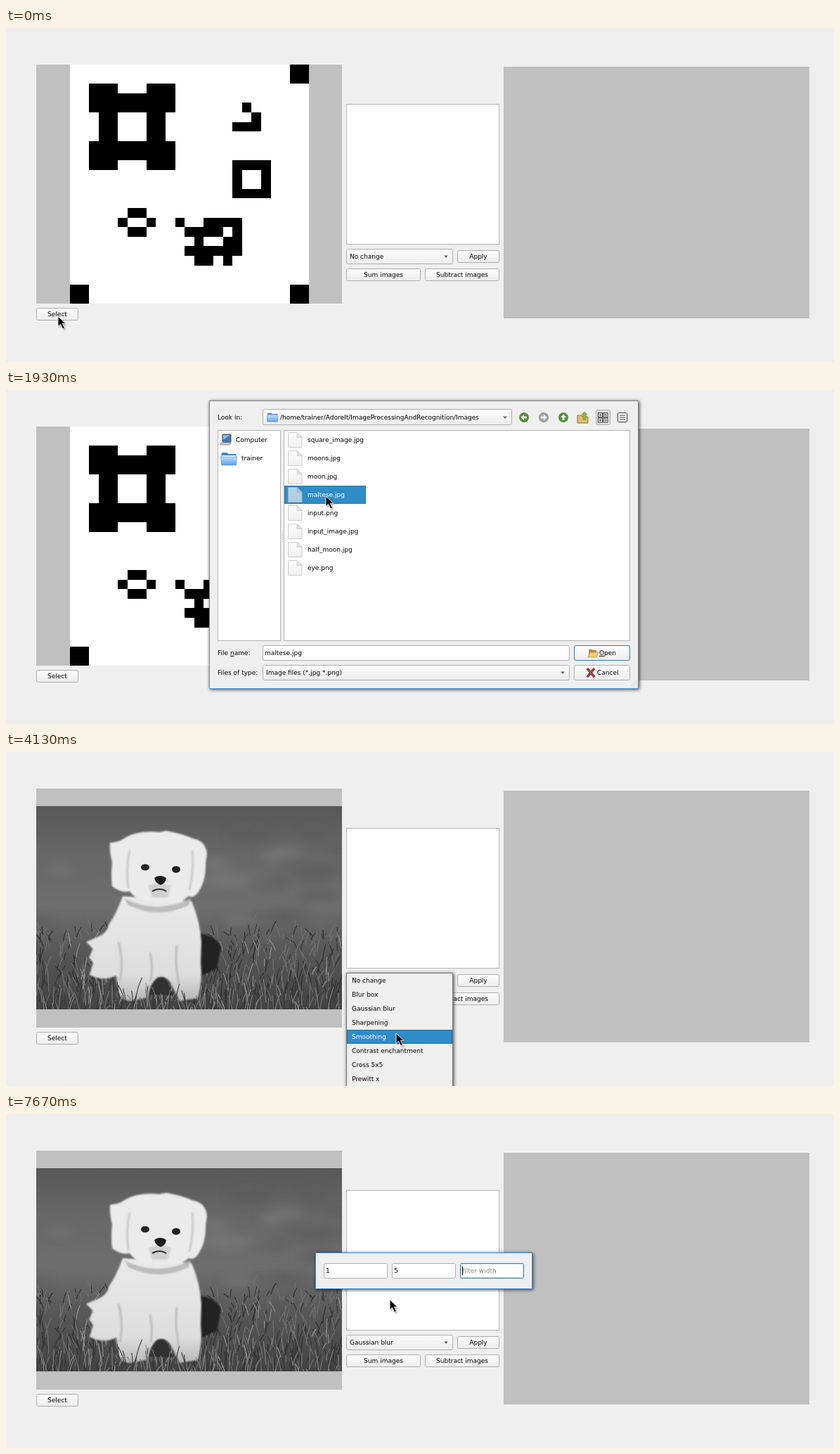
Write an HTML page that moves like this. It is 1178 px wide and 475 px high and loops after 8000 ms.

```html
<!DOCTYPE html>
<html lang="en">
<head>
<meta charset="utf-8">
<title>Image filter demo</title>
<style>
html, body { margin: 0; width: 100%; height: 100%; overflow: hidden; background: #efefef; }
svg { display: block; width: 1178px; height: 475px; }
text { font: 9px "DejaVu Sans", sans-serif; fill: #000; white-space: pre; }
.mid { text-anchor: middle; }
.hint { fill: #8c8c8c; }
.light { fill: #fff; }
.off { fill: #b4b4b4; }
</style>
</head>
<body>
<svg id="stage" viewBox="0 0 1178 475">
  <defs>
    <linearGradient id="face" x2="0" y2="1"><stop stop-color="#fdfdfd"/><stop offset="1" stop-color="#ececec"/></linearGradient>
    <linearGradient id="blue" x2="0" y2="1"><stop stop-color="#bfdcfa"/><stop offset="1" stop-color="#5d9fe6"/></linearGradient>
    <linearGradient id="paper" x2="0" y2="1"><stop stop-color="#fdfdfd"/><stop offset="1" stop-color="#efefef"/></linearGradient>
    <linearGradient id="lawn" x2="0" y2="1">
      <stop stop-color="#585858"/><stop offset=".25" stop-color="#686868"/><stop offset=".5" stop-color="#6e6e6e"/>
      <stop offset=".68" stop-color="#5a5a5a"/><stop offset="1" stop-color="#434343"/>
    </linearGradient>
    <linearGradient id="coat" x2="0" y2="1"><stop stop-color="#e9e9e9"/><stop offset=".75" stop-color="#dedede"/><stop offset="1" stop-color="#b8b8b8"/></linearGradient>
    <filter id="shade" x="-10%" y="-20%" width="120%" height="140%"><feDropShadow dx="1" dy="1" stdDeviation="2.5" flood-opacity=".75"/></filter>
    <filter id="soft" x="-50%" y="-50%" width="200%" height="200%"><feGaussianBlur stdDeviation="7"/></filter>
    <filter id="fuzz"><feGaussianBlur stdDeviation="1"/></filter>
    <clipPath id="photo"><path d="M43 77h435v289H43z"/></clipPath>
  </defs>
</svg>
<script>
const LOOP = 8000;
const stage = document.getElementById('stage');

// Seeded random numbers for the lawn
let seed = 7;
const rnd = (lo, hi) => {
  seed = (seed * 16807) % 2147483647;
  return lo + (hi - lo) * seed / 2147483647;
};

// Markup helpers; `during` shows its content between two times
const during = (from, to, body) => `<g data-from="${from}" data-to="${to}">${body}</g>`;
const text = (x, y, s, cls = '') => `<text x="${x}" y="${y}" class="${cls}">${s}</text>`;
const rect = (x, y, w, h, fill, extra = '') =>
  `<rect x="${x}" y="${y}" width="${w}" height="${h}" fill="${fill}" ${extra}/>`;
const path = (d, fill, extra = '') => `<path d="${d}" fill="${fill}" ${extra}/>`;
const frame = (x, y, w, h, fill, line, r = 2) =>
  rect(x + .5, y + .5, w - 1, h - 1, fill, `stroke="${line}" rx="${r}"`);
const box = (x, y, w, h, fill = 'url(#face)') => frame(x, y, w, h, fill, '#aeaeae');
const button = (x, y, w, label) => box(x, y, w, 18) + text(x + w / 2, y + 12, label, 'mid');
const arrow = (x, y) => path(`M${x - 3} ${y - 1.5}h6l-3 3.5z`, '#666');
const at = (x, y, body) => `<g transform="translate(${x} ${y})">${body}</g>`;
const caret = (x, y) => rect(x, y, 1, 12, '#000');
const focusRing = (x, y, w, h) => frame(x, y, w, h, '#fff', '#3584b5') +
  frame(x + 1, y + 1, w - 2, h - 2, 'none', '#c6dfee', 1);

const folder = (x, y, s = 1) => at(x, y, `<g transform="scale(${s})">` +
  path('M1 2q0-1 1-1h7l2 2h10q1 0 1 1v14H1z', '#4688cf') + path('M2 5h19v2H2z', '#f2f8ff') +
  path('M0 7h23l-1 11q0 1-1 1H2q-1 0-1-1z', 'url(#blue)', 'stroke="#5b98d9" stroke-width=".6"') + '</g>');
const page = (x, y) => at(x, y,
  path('M.5 1q0-.5.5-.5h12l7 7V21q0 .5-.5.5H1q-.5 0-.5-.5z', 'url(#paper)', 'stroke="#cdcdcd"') +
  path('M13 .5V7.5h7z', '#e2e2e2', 'stroke="#c6c6c6" stroke-width=".7"'));
const navButton = (x, color, turn) => at(x, 39,
  `<circle r="6.7" fill="${color}" stroke="#0004" stroke-width=".8"/>` +
  path('M-4.5 0L0-4V-1.5H4V1.5H0V4z', '#fff', `transform="rotate(${turn})"`));

function cellPicture() {
  const cells = 'M23 0h2v2h-2zM0 23h2v2h-2zM23 23h2v2h-2z' +
    'M2 2h3v1h3v-1h3v3h-1v3h1v3h-3v-1h-3v1h-3v-3h1v-3h-1zM5 5v3h3v-3z' +
    'M18 4h1v1h-1zM19 5h1v2h-3v-1h2zM17 10h4v4h-4zM18 11v2h2v-2z' +
    'M6 15h2v1h-2zM5 16h1v1h-1zM8 16h1v1h-1zM6 17h2v1h-2z' +
    'M11 16h1v1h-1zM14 16h4v4h-1v1h-1v-1h-1v1h-2v-1h-1v-1h1v-1h-1v-1h2zM16 17v1h1v-1zM14 18v1h2v-1z';
  return rect(91, 52, 340, 340, '#fff') +
    path(cells, '#000', 'transform="translate(91 52) scale(13.6)" fill-rule="evenodd" shape-rendering="crispEdges"');
}

function blades(count, top, bottom, color) {
  let d = '';
  for (let i = 0; i < count; i++) {
    const y = rnd(top, bottom), h = rnd(.04, .15) * (y - 130), lean = rnd(-9, 9);
    d += `M${rnd(43, 478).toFixed(1)} ${y.toFixed(1)}q${(lean / 5).toFixed(1)} ${(-h / 2).toFixed(1)} ${lean.toFixed(1)} ${(-h).toFixed(1)}`;
  }
  return path(d, 'none', `stroke="${color}" stroke-width="1.1"`);
}

function dogPhoto() {
  let haze = '';
  for (let i = 0; i < 26; i++)
    haze += `<ellipse cx="${rnd(43, 478)}" cy="${rnd(110, 250)}" rx="${rnd(12, 40)}" ry="${rnd(5, 14)}" fill="${i % 2 ? '#808080' : '#595959'}" opacity=".45"/>`;
  const body = 'M166 205Q158 228 146 246Q144 258 128 264L114 270L124 280L118 292L124 300L119 317Q138 327 157 318' +
    'L160 345Q165 354 178 354L202 349Q204 330 215 321Q228 316 235 330L247 354L273 350Q280 325 277 300' +
    'L278 270Q276 240 264 212Z';
  const head = 'M148 129Q162 128 169 122Q188 111 218 114L228 112Q254 117 266 123Q284 126 286 145' +
    'L284 158Q285 180 275 197Q268 209 260 205Q250 215 232 213Q219 220 207 211Q184 211 176 198Q164 201 151 191' +
    'Q149 175 151 157Q147 142 148 129Z';
  return `<g clip-path="url(#photo)">` + rect(43, 77, 435, 289, 'url(#lawn)') + `<g filter="url(#soft)">${haze}</g>` +
    blades(260, 255, 375, '#303030') + blades(230, 245, 380, '#727272') + blades(60, 270, 380, '#949494') +
    path('M276 258Q300 262 306 278L300 308L270 322Z', '#222', 'filter="url(#fuzz)"') +
    path('M203 345Q208 318 225 318L238 346Z', '#303030') +
    `<g filter="url(#fuzz)">` + path(body, 'url(#coat)') +
    path('M168 208Q215 232 263 208L260 218Q218 238 174 218Z', '#bcbcbc') +
    path('M160 270Q168 300 162 325M205 285Q209 305 206 325M243 275Q240 302 246 330', 'none', 'stroke="#bbb" stroke-width="3"') +
    path(head, '#ebebeb') +
    path('M176 140Q170 165 174 194M265 140Q268 165 261 196', 'none', 'stroke="#c9c9c9" stroke-width="3"') +
    path('M202 190Q218 184 235 190L230 207H208Z', '#d0d0d0') + '</g>' +
    '<ellipse cx="198" cy="164" rx="6" ry="4.5" fill="#222"/><ellipse cx="242" cy="167" rx="6" ry="4.8" fill="#222"/>' +
    path('M211 179Q219 173 228 179Q227 187 220 189Q213 187 211 179Z', '#1c1c1c') +
    path('M208 198Q219 192 228 198', 'none', 'stroke="#333" stroke-width="2"') +
    blades(70, 352, 380, '#3a3a3a') + blades(70, 352, 382, '#808080') + '</g>';
}

function mainWindow() {
  return rect(43, 52, 435, 340, '#c0c0c0') + rect(708, 55, 435, 358, '#c0c0c0') +
    during(0, 2200, cellPicture()) + during(2200, LOOP, dogPhoto()) +
    button(43, 398, 60, 'Select') +
    during(270, 400, frame(43, 398, 60, 18, '#d9d9d9', '#a0a0a0') + text(73, 410, 'Select', 'mid')) +
    frame(484, 108, 218, 200, '#fff', '#b4b4b4', 0) +
    box(484, 314, 152, 22) + arrow(626, 325) +
    during(0, 5030, text(489, 328, 'No change')) + during(5030, LOOP, text(489, 328, 'Gaussian blur')) +
    button(642, 316, 60, 'Apply') + button(484, 342, 106, 'Sum images') + button(596, 342, 106, 'Subtract images');
}

function selectedRow(row, width, name, icon) {
  const y = 58 + 26 * row;
  return frame(396, y, width, 26, '#308cc6', '#2a7fb5', 0) + icon + text(429, y + 16, name, 'light');
}

function fileDialog() {
  const root = '/home/trainer/AdoreIt/ImageProcessingAndRecognition';
  const folders = ['RANSACCircle', 'MorphologicalOperations', 'LinearFiltering', 'Images', 'HistogramBinarizationOtsu', 'BilateralFilter'];
  const files = ['square_image.jpg', 'moons.jpg', 'moon.jpg', 'maltese.jpg', 'input.png', 'input_image.jpg', 'half_moon.jpg', 'eye.png'];
  const rows = (names, icon) => names.map((n, i) => icon(i) + text(429, 74 + 26 * i, n)).join('');
  const folderAt = i => folder(400, 61 + 26 * i);
  const pageAt = i => page(401, 60 + 26 * i);
  const openIcon = path('M829 369h5l1 1h5v9h-11z', '#b98a3c') + path('M828 380l3-7h12l-3 7z', '#f0cd83', 'stroke="#a87b30" stroke-width=".6"');
  const underlined = s => `<tspan text-decoration="underline">${s}</tspan>`;
  const open = underlined('O') + 'pen';
  const disabledOpen = frame(808, 363, 80, 22, '#ededed', '#d0d0d0') + `<g opacity=".4" style="filter:grayscale(1)">${openIcon}</g>` + text(844, 377, open, 'off');
  const enabledOpen = (line) => frame(808, 363, 80, 22, 'url(#face)', line) + openIcon + text(844, 377, open);
  let grip = '';
  for (let i = 0; i < 4; i++) for (let j = 0; j <= i; j++) grip += rect(896 - 3 * j, 413 + 3 * i, 1, 1, '#b8b8b8');
  let dots = '';
  for (let i = 0; i < 6; i++) dots += rect(393, 200 + 3 * i, 1, 1, '#b0b0b0');

  return `<g filter="url(#shade)">${rect(289.5, 15.5, 610, 409, '#efefef', 'stroke="#858585"')}</g>` +
    rect(290, 424, 609, 1, '#4b97dd') +
    text(301, 42, 'Look in:') + box(365, 27, 355, 23) + folder(371, 32, .7) + arrow(710, 39) +
    during(0, 1400, text(390, 42, root)) + during(1400, LOOP, text(390, 42, root + '/Images')) +
    navButton(737, '#4c962d', 0) + navButton(765, '#a3a3a3', 180) + navButton(793, '#4c962d', 90) +
    path('M813 36h6l1 2h8v9h-15z', '#e2bd6c', 'stroke="#8a7136"') + path('M821 42v-7h-2l4-4 4 4h-2v7z', '#8bbd3d', 'stroke="#5d8728" stroke-width=".6"') +
    frame(839, 28, 21, 22, '#e2e2e2', '#aaa') +
    [[842, 32], [849.5, 32], [842, 39.5], [849.5, 39.5]].map(([x, y]) => rect(x + .5, y + .5, 6, 6, '#fff', 'stroke="#333"') + rect(x + 2, y + 2, 3, 3, '#777')).join('') +
    rect(870.5, 32.5, 13, 13, '#fff', 'stroke="#333" rx="1"') + path('M873 36h8M873 39h8M873 42h8', 'none', 'stroke="#333"') +
    frame(301, 57, 90, 300, '#fff', '#b4b4b4', 0) + dots +
    rect(308, 63, 12, 11, '#3c78b4', 'stroke="#555" rx="1"') + path('M309 64h10l-10 7z', '#8fbce4') + path('M306 75h14l-2 3h-13z', '#ddd', 'stroke="#555" stroke-width=".7"') +
    text(327, 74, 'Computer') + folder(305.5, 88) + text(335, 100, 'trainer') +
    frame(395, 57, 493, 300, '#fff', '#b4b4b4', 0) +
    during(0, 1400, rows(folders, folderAt)) +
    during(1200, 1400, selectedRow(3, 158, 'Images', folderAt(3))) +
    during(1400, LOOP, rows(files, pageAt)) +
    during(1830, LOOP, selectedRow(3, 116, 'maltese.jpg', `<g opacity=".65">${pageAt(3)}</g>`)) +
    text(301, 377, `File ${underlined('n')}ame:`) + box(365, 363, 437, 22, '#fff') +
    during(0, 1200, focusRing(365, 363, 437, 22) + caret(368, 368)) +
    during(1830, LOOP, text(368, 377, 'maltese.jpg')) +
    during(0, 1200, disabledOpen) + during(1200, 1400, enabledOpen('#aeaeae')) +
    during(1400, 1830, disabledOpen) + during(1830, LOOP, enabledOpen('#3b7ca6')) +
    text(301, 405, 'Files of type:') + box(365, 391, 437, 22) + text(370, 405, 'Image files (*.jpg *.png)') + arrow(792, 402) +
    box(808, 391, 80, 22) + path('M827 396L837 408M837 396L827 408', 'none', 'stroke="#3d2020" stroke-width="3.4"') +
    path('M827 396L837 408M837 396L827 408', 'none', 'stroke="#c93a35" stroke-width="2"') + text(841, 405, 'Cancel') + grip;
}

const filters = ['No change', 'Blur box', 'Gaussian blur', 'Sharpening', 'Smoothing', 'Contrast enchantment', 'Cross 5x5', 'Prewitt x', 'Prewitt y'];
const filterMenu = () =>
  `<g filter="url(#shade)">${rect(484.5, 314.5, 151, 190, '#efefef', 'stroke="#777"')}</g>` +
  `<g id="bar">${frame(485, 315, 150, 20, '#308cc6', '#236f9f', 0)}</g>` +
  `<g id="items">${filters.map((f, i) => text(492, 328 + 20 * i, f)).join('')}</g>`;

function paramDialog() {
  const field = (x, hint, focus, typed, value) =>
    box(x, 212, 91, 22, '#fff') +
    during(focus[0], focus[1], focusRing(x, 212, 91, 22)) +
    during(0, typed, text(x + 3, 226, hint, 'hint')) +
    during(typed, LOOP, text(x + 3, 226, value));
  return `<g filter="url(#shade)">${rect(440.5, 197.5, 308, 51, '#efefef', 'stroke="#3f8ae0"')}</g>` +
    field(452, 'sigma', [0, 7070], 6030, '1') +
    field(549, 'filter height', [7070, 7670], 7430, '5') +
    field(646, 'filter width', [7670, LOOP], LOOP, '') +
    during(0, 6030, caret(455, 217)) + during(6030, 6670, caret(461, 217)) +
    during(7070, 7430, caret(552, 217)) + during(7430, 7670, caret(558, 217)) + during(7670, LOOP, caret(649, 217));
}

const pointer = 'M0 0V14.5L3.5 11.2L6.6 17.8L9.4 16.6L6.3 10.3H11Z';

stage.insertAdjacentHTML('beforeend', mainWindow() +
  during(400, 2200, `<g id="files">${fileDialog()}</g>`) +
  during(3530, 5030, filterMenu()) +
  during(5130, LOOP, `<g id="params">${paramDialog()}</g>`) +
  `<g id="pointer">${path(pointer, '#000', 'opacity=".4" filter="url(#fuzz)" transform="translate(1.5 2)"')}${path(pointer, '#000', 'stroke="#fff" stroke-width=".9"')}</g>`);

// Pointer stops: time, x, y
const stops = [
  [0, 74, 410], [640, 95, 396], [690, 150, 358], [740, 205, 320], [790, 255, 287], [830, 281, 270],
  [1070, 400, 190], [1130, 453, 146], [1670, 455, 151], [2470, 456, 152], [2730, 517, 233], [3000, 532, 288],
  [3230, 541, 318], [3630, 543, 324], [3730, 546, 337], [3820, 549, 352], [3920, 551, 370], [4010, 553, 385],
  [4110, 555, 400], [4200, 556, 412], [4300, 556, 423], [4400, 556, 405], [4500, 556, 386], [4630, 556, 367],
  [4770, 557, 365], [4870, 558, 365], [5230, 553, 330], [5330, 549, 290], [5430, 546, 264]
];

const byId = id => document.getElementById(id);
const timed = [...document.querySelectorAll('[data-from]')];
const items = [...byId('items').children];
const fade = (t, from, to) => Math.min(1, Math.max(0, (t - from) / (to - from)));

function draw(now) {
  const t = now % LOOP;
  for (const el of timed) el.style.display = t >= +el.dataset.from && t < +el.dataset.to ? '' : 'none';
  byId('files').setAttribute('opacity', fade(t, 420, 580));
  byId('params').setAttribute('opacity', fade(t, 5080, 5430));

  const [, x, y] = stops.findLast(s => s[0] <= t);
  byId('pointer').setAttribute('transform', `translate(${x} ${y})`);
  const row = Math.floor((y - 315) / 20);
  byId('bar').setAttribute('transform', `translate(0 ${20 * row})`);
  items.forEach((el, i) => el.classList.toggle('light', i === row));
  requestAnimationFrame(draw);
}
draw(0);
</script>
</body>
</html>
```
